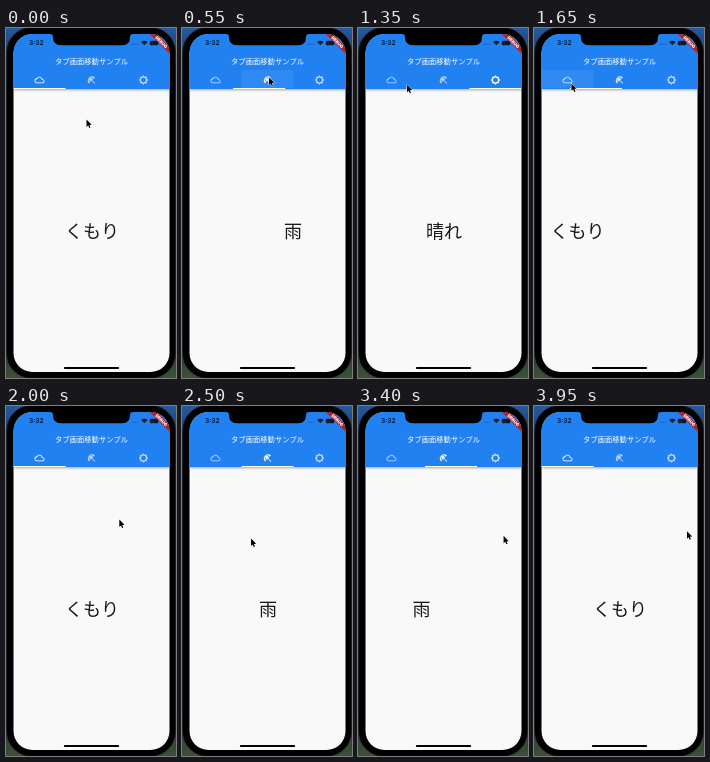
Recreate the animation shown at these times as an HTML page with a canvas. Size 170 by 350 pixels, loop 4 s.

```html
<!DOCTYPE html>
<html lang="ja">
<head>
<meta charset="utf-8">
<title>タブ画面移動サンプル</title>
<style>
html, body { margin: 0; width: 100%; height: 100%; overflow: hidden; background: #000; }
canvas { display: block; width: 170px; height: 350px; }
</style>
</head>
<body>
<canvas id="stage"></canvas>
<script>
const W = 170, H = 350, LOOP = 4000, STEP = 50;
const JP = '"Noto Sans CJK JP", "Noto Sans CJK", sans-serif';
const LATIN = 'Inter, "Liberation Sans", sans-serif';
const screenBox = { x: 7.5, y: 6, w: 156, h: 338 };
const TAB = screenBox.w / 3, BAR_END = 61;

const canvas = document.getElementById('stage');
const ratio = window.devicePixelRatio || 1;
canvas.width = W * ratio;
canvas.height = H * ratio;
const c = canvas.getContext('2d');

const labels = ['くもり', '雨', '晴れ'];
const icons = [
  'M19.35 10.04C18.67 6.59 15.64 4 12 4 9.11 4 6.6 5.64 5.35 8.04 2.34 8.36 0 10.91 0 14c0 3.31 2.69 6 6 6h13c2.76 0 5-2.24 5-5 0-2.64-2.05-4.78-4.65-4.96zM19 18H6c-2.21 0-4-1.79-4-4s1.79-4 4-4h.71C7.37 7.69 9.48 6 12 6c3.04 0 5.5 2.46 5.5 5.5v.5H19c1.66 0 3 1.34 3 3s-1.34 3-3 3z',
  'M13.13 14.56l1.43-1.43 6.44 6.44L19.57 21zM17.42 8.83l2.86-2.86c-3.95-3.95-10.35-3.96-14.3-.02 3.93-1.3 8.31-.25 11.44 2.88zM5.95 5.98c-3.94 3.95-3.93 10.35.02 14.3l2.86-2.86C5.7 14.29 4.65 9.91 5.95 5.98zM5.97 5.96l-.01.01c-.38 3.01 1.17 6.88 4.3 10.02l5.73-5.73c-3.13-3.13-7.01-4.68-10.02-4.3z',
  'M20 15.31L23.31 12 20 8.69V4h-4.69L12 .69 8.69 4H4v4.69L.69 12 4 15.31V20h4.69L12 23.31 15.31 20H20v-4.69zM12 18c-3.31 0-6-2.69-6-6s2.69-6 6-6 6 2.69 6 6-2.69 6-6 6z'
].map(d => new Path2D(d));

const linear = u => u;
const easeOut = u => 1 - (1 - u) ** 2;
const smooth = u => u * u * (3 - 2 * u);
const mix = (a, b, u) => a + (b - a) * u;
const clamp = v => Math.max(0, Math.min(1, v));

// cubic-bezier(.25, .1, .25, 1)
function ease(x) {
  let lo = 0, hi = 1, s = x;
  for (let i = 0; i < 20; i++) {
    s = (lo + hi) / 2;
    const bx = .75 * s * (1 - s) + s ** 3;
    if (bx < x) lo = s; else hi = s;
  }
  return .3 * s * (1 - s) ** 2 + 3 * s * s * (1 - s) + s ** 3;
}

// each move: start, end, from, to, easing
const moves = [
  [388, 688, 0, 1, ease],
  [950, 1250, 1, 2, ease],
  [1520, 1820, 2, 0, ease],
  [2090, 2220, 0, .32, linear],
  [2220, 2480, .32, 1, easeOut],
  [2630, 2760, 1, 1.52, linear],
  [2760, 3114, 1.52, 2, easeOut],
  [3170, 3290, 2, 1.53, linear],
  [3290, 3520, 1.53, 1, easeOut],
  [3530, 3640, 1, .52, linear],
  [3640, 3900, .52, 0, easeOut]
];
const taps = [[388, 1], [950, 2], [1520, 0]];

// time, x, y of the pointer tip
const pointer = [
  [0, 80.5, 91.5], [50, 80.5, 91.5], [340, 87, 49.5], [620, 87, 49.5], [900, 137, 50],
  [1080, 137, 50], [1350, 49, 56.8], [1480, 33, 52], [1600, 33, 52],
  [1950, 113.3, 113.5], [2000, 113.3, 113.5], [2080, 125, 130], [2220, 69, 132.5],
  [2500, 69, 132.5], [2610, 148, 133], [2760, 62, 133], [2950, 153, 133],
  [3040, 153, 133], [3160, 70, 132], [3290, 150, 130], [3380, 150, 130],
  [3520, 70, 127], [3640, 153, 125.3], [4000, 153, 125.3]
];

function tabPos(t) {
  let pos = 0;
  for (const [a, b, from, to, fn] of moves) {
    if (t >= a) pos = mix(from, to, fn(clamp((t - a) / (b - a))));
  }
  return pos;
}

function pointerPos(t) {
  let i = 0;
  while (i < pointer.length - 2 && t >= pointer[i + 1][0]) i++;
  const [a, x0, y0] = pointer[i], [b, x1, y1] = pointer[i + 1];
  const u = smooth((t - a) / (b - a));
  return [mix(x0, x1, u), mix(y0, y1, u)];
}

function rounded(x, y, w, h, r) {
  c.beginPath();
  c.roundRect(x, y, w, h, r);
}

function text(str, x, y, font, color) {
  c.font = font;
  c.fillStyle = color;
  c.textAlign = 'center';
  c.textBaseline = 'middle';
  c.fillText(str, x, y);
}

function drawBody() {
  const g = c.createLinearGradient(0, 0, 0, H);
  g.addColorStop(0, '#265a9c');
  g.addColorStop(.12, '#16305a');
  g.addColorStop(.85, '#1b2a38');
  g.addColorStop(1, '#3c5038');
  c.fillStyle = g;
  c.fillRect(0, 0, W, H);
  rounded(.6, -.6, 169, 351, 25);
  c.fillStyle = '#000';
  c.fill();
  c.strokeStyle = '#25282c';
  c.lineWidth = .7;
  c.stroke();
}

function drawPages(t, pos) {
  // a jump across two tabs slides as if the pages were neighbours
  const jump = t >= 1520 && t < 1820;
  const shown = jump ? [labels[0], labels[2]] : labels;
  const p = jump ? pos / 2 : pos;
  shown.forEach((label, i) => {
    const x = 86 + (i - p) * screenBox.w;
    if (x > -30 && x < W + 30) text(label, x, 203, '300 18px ' + JP, '#181818');
  });
}

function drawHighlights(t) {
  for (const [start, tab] of taps) {
    const u = (t - start) / 420;
    if (u < 0 || u > 1) continue;
    c.fillStyle = `rgba(255,255,255,${.1 * (1 - u)})`;
    c.fillRect(screenBox.x + tab * TAB, 42, TAB, 18);
  }
}

function drawBar(t, pos) {
  c.save();
  c.shadowColor = 'rgba(0,0,0,.34)';
  c.shadowBlur = 2.4 * ratio;
  c.shadowOffsetY = .8 * ratio;
  c.fillStyle = '#2181f1';
  c.fillRect(screenBox.x, 0, screenBox.w, BAR_END);
  c.restore();
  text('タブ画面移動サンプル', 85.6, 33.6, '400 7.3px ' + JP, '#fff');
  drawHighlights(t);
  icons.forEach((icon, i) => {
    c.save();
    c.translate(screenBox.x + (i + .5) * TAB - 5, 47);
    c.scale(10 / 24, 10 / 24);
    c.fillStyle = `rgba(255,255,255,${.7 + .3 * clamp(1 - Math.abs(pos - i))})`;
    c.fill(icon, 'evenodd');
    c.restore();
  });
  c.fillStyle = '#fff';
  c.fillRect(screenBox.x + pos * TAB, 60, TAB, 1);
}

function drawStatus() {
  text('3:32', 30.3, 15.2, '700 6.5px ' + LATIN, '#0b1a30');
  c.fillStyle = 'rgba(16,33,58,.45)';
  for (let i = 0; i < 4; i++) c.fillRect(126 + i * 1.7, 15.8, 1, 1);
  c.fillStyle = '#0b1a30';
  c.beginPath();
  c.moveTo(138.3, 17.3);
  c.arc(138.3, 17.3, 4.6, -Math.PI * .75, -Math.PI * .25);
  c.fill();
  rounded(143.8, 12.8, 8.6, 4.4, 1.2);
  c.fill();
}

function drawBanner() {
  c.save();
  c.translate(163.5, 6);
  c.rotate(Math.PI / 4);
  c.fillStyle = 'rgba(183,28,28,.88)';
  c.fillRect(-22, 9, 44, 5);
  text('DEBUG', 0, 11.7, '900 4.3px ' + LATIN, '#fff');
  c.restore();
}

function drawNotch() {
  c.fillStyle = '#000';
  c.beginPath();
  c.moveTo(44, 5);
  c.lineTo(44, 6);
  c.quadraticCurveTo(47, 6, 47, 9);
  c.quadraticCurveTo(47, 17.3, 55, 17.3);
  c.lineTo(116, 17.3);
  c.quadraticCurveTo(124, 17.3, 124, 9);
  c.quadraticCurveTo(124, 6, 127, 6);
  c.lineTo(127, 5);
  c.fill();
}

function drawPointer(x, y) {
  const tip = [[0, 0], [0, 7.4], [1.7, 5.9], [2.8, 8.5], [4, 8], [2.9, 5.4], [5.2, 5.3]];
  c.beginPath();
  tip.forEach(([dx, dy]) => c.lineTo(x + dx, y + dy));
  c.closePath();
  c.lineJoin = 'round';
  c.lineWidth = 1;
  c.strokeStyle = '#fff';
  c.stroke();
  c.fillStyle = '#000';
  c.fill();
}

function draw(t) {
  const pos = tabPos(t);
  c.setTransform(ratio, 0, 0, ratio, 0, 0);
  drawBody();
  c.save();
  rounded(screenBox.x, screenBox.y, screenBox.w, screenBox.h, 19);
  c.clip();
  c.fillStyle = '#f9f9f9';
  c.fillRect(0, 0, W, H);
  drawPages(t, pos);
  drawBar(t, pos);
  drawStatus();
  drawBanner();
  drawNotch();
  rounded(57.8, 339, 55.4, 2, 1);
  c.fillStyle = '#000';
  c.fill();
  c.restore();
  drawPointer(...pointerPos(t));
}

const begin = performance.now();
function tick() {
  const t = (performance.now() - begin) % LOOP;
  draw(Math.floor(t / STEP) * STEP);
  requestAnimationFrame(tick);
}
tick();
</script>
</body>
</html>
```
